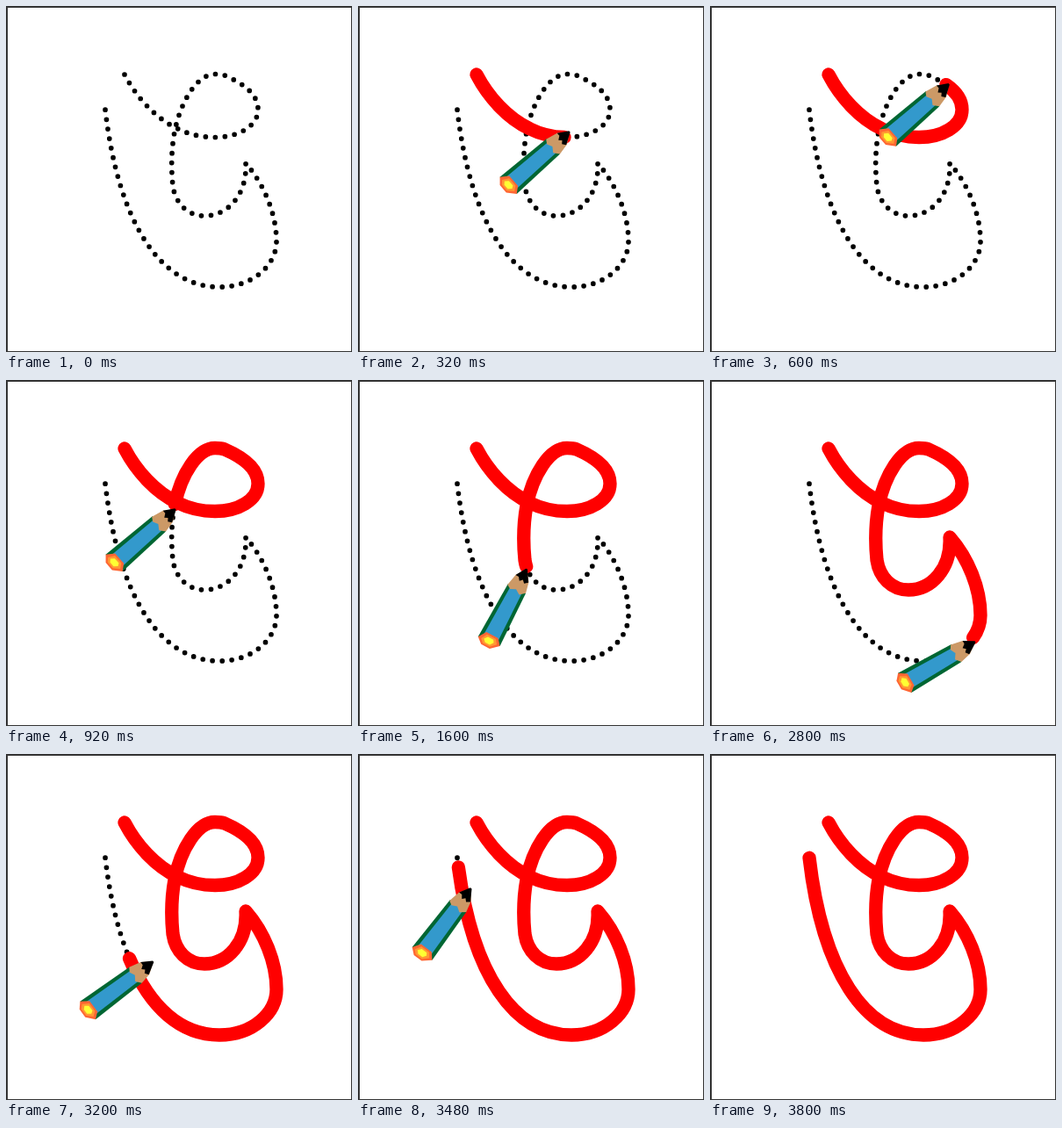
An HTML page that plays this animation: 394 by 394 pixels, repeating every 3840 ms.

```html
<!DOCTYPE html>
<html lang="en">
<head>
<meta charset="utf-8">
<title>Letter tracing</title>
<style>
  html, body { margin: 0; width: 100%; height: 100%; overflow: hidden; background: #333; }
  svg { display: block; width: 100%; height: 100%; }
  .trail { fill: none; stroke-linecap: round; stroke-linejoin: round; }
</style>
</head>
<body>
<svg viewBox="0 0 394 394">
  <defs>
    <!-- Lengths along the letter are counted in dot gaps. -->
    <path id="letter" pathLength="91.02" d="M135 78 C148 103 170 128 196 140
      C208 146 223 149.5 238 149.5 C264 149.5 287 137 287 118 C287 101 272 89 249 79
      C245 77.5 242 77.5 238 77.5 C218 77.5 199 108 192 143 C188 165 188 185 190 205
      C193 225 207 239 226 239 C252 239 275 215 273 179 C294 203 308 237 308 268
      C308 295 281 320 243 320 C176 320 128 247 113 118"/>
  </defs>
  <rect x="2" y="2" width="391" height="391" fill="#fff"/>
  <use href="#letter" class="trail" stroke="#000" stroke-width="5.7" stroke-dasharray="0 1"/>
  <use href="#letter" class="trail" id="ink" stroke="#f00" stroke-width="15.3"/>
  <!-- The pencil points right, with its tip at the origin. -->
  <g id="pencil">
    <path fill="#063" d="M-25-11 L-94-13 L-92 14 L-25 12Z"/>
    <path fill="#39c" d="M-25-7 L-90-8.5 L-90 9.5 L-25 8Z"/>
    <path fill="#c96" d="M0 0 L-12-8 L-26-11 L-29-6 L-26 0 L-30 6 L-25 12 L-12 9Z"/>
    <path d="M0-1 L-12-8 L-12-4 L-16-1 L-13 2 L-16 5 L-13 9 L0 1Z"/>
    <path fill="#f63" d="M-94-13 L-85-7 L-85 8 L-92 14 L-100 5 L-100-6Z"/>
    <path fill="#f93" d="M-94-9 L-87-5 L-87 6 L-92 10 L-98 4 L-98-5Z"/>
    <path fill="#ff3" d="M-93-6 L-89-3 L-89 4 L-92 6 L-96 3 L-96-3Z"/>
  </g>
</svg>
<script>
const STEP = 40, FRAMES = 96, FADE_START = 90, FADE_STEPS = 5, DOT_GAPS = 91;
const letter = document.getElementById('letter');
const ink = document.getElementById('ink');
const pencil = document.getElementById('pencil');
const dotLength = letter.getTotalLength() / DOT_GAPS;

const lerp = (a, b, t) => a + (b - a) * t;
const easeOut = t => 1 - (1 - t) ** 2;

// Each leg gives the pose it ends in; the pencil follows the letter or glides straight.
const rest = { ink: 0, x: 134, y: 76, angle: -41 };
const legs = [
  { start: 0, end: 8, ink: 11.7, x: 241, y: 143, angle: -41 },
  { start: 8, end: 23, ink: 31.6, x: 193, y: 147, angle: -41 },
  { start: 34, end: 51, ink: 50, x: 273, y: 177, angle: -101 },
  { start: 62, end: 70, ink: 61.4, x: 302, y: 298, angle: -30 },
  { start: 70, end: 76, ink: 70, x: 190, y: 284, angle: -27, glide: true },
  { start: 76, end: 90, ink: DOT_GAPS, x: 112, y: 117, angle: -60, glide: true, ease: easeOut }
];

const pointAt = dots => letter.getPointAtLength(dots * dotLength);

function poseAt(frame) {
  const index = legs.findLastIndex(leg => leg.start <= frame);
  const from = legs[index - 1] || rest, to = legs[index];
  const t = Math.min(1, (frame - to.start) / (to.end - to.start));
  const drawn = lerp(from.ink, to.ink, to.ease ? to.ease(t) : t);
  const here = pointAt(drawn), first = pointAt(from.ink), last = pointAt(to.ink);
  const tip = axis => to.glide
    ? lerp(from[axis], to[axis], t)
    : here[axis] + lerp(from[axis] - first[axis], to[axis] - last[axis], t);
  return { drawn, x: tip('x'), y: tip('y'), angle: lerp(from.angle, to.angle, t) };
}

function draw(now) {
  const frame = Math.floor(now / STEP) % FRAMES;
  const { drawn, x, y, angle } = poseAt(frame);
  const fade = Math.max(0, frame - FADE_START) / FADE_STEPS;
  ink.style.visibility = frame ? 'visible' : 'hidden';
  ink.setAttribute('stroke-dasharray', `${drawn} 200`);
  pencil.setAttribute('transform', `translate(${x} ${y}) rotate(${angle})`);
  pencil.setAttribute('opacity', frame ? 1 - fade : 0);
}

const start = performance.now();
function tick() {
  draw(performance.now() - start);
  requestAnimationFrame(tick);
}
tick();
</script>
</body>
</html>
```
